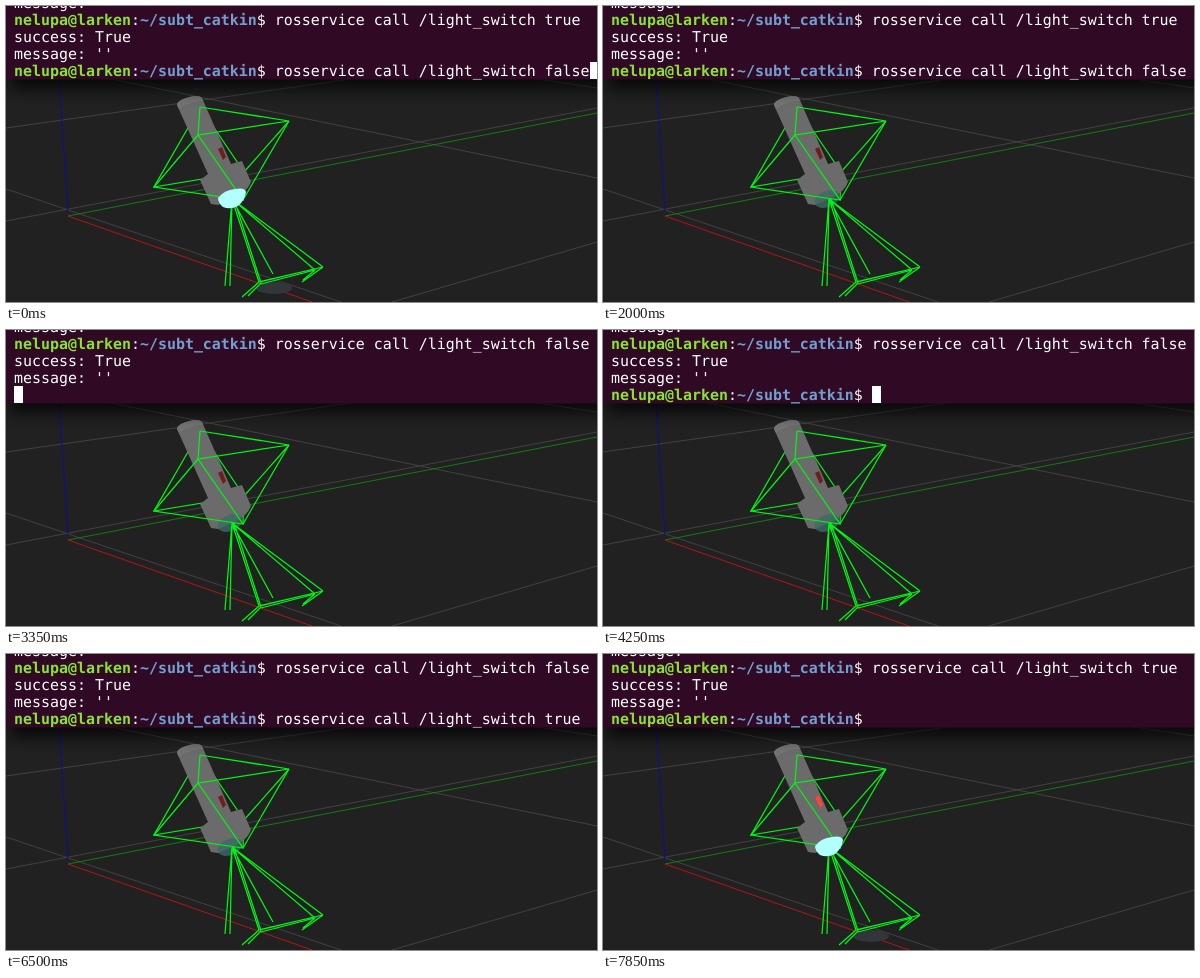
Recreate the animation shown at these times as an HTML page. Size 591 px wide and 296 px high, loop 8 s.

```html
<!DOCTYPE html>
<html lang="en">
<head>
<meta charset="utf-8">
<title>Light switch service</title>
<style>
  html, body { margin: 0; width: 100%; height: 100%; overflow: hidden; background: #212121; }
  svg { display: block; width: 591px; height: 296px; }
  text {
    font: 14.95px "DejaVu Sans Mono", monospace;
    fill: #fff;
    white-space: pre;
    text-rendering: geometricPrecision;
  }
  .user { fill: #8ae234; font-weight: bold; }
  .path { fill: #729fcf; font-weight: bold; }
  .wire { fill: none; stroke: #00f514; stroke-width: 1.25; }
</style>
</head>
<body>
<svg viewBox="0 0 591 296">
  <defs>
    <filter id="blur" x="-10%" y="-50%" width="120%" height="200%">
      <feGaussianBlur stdDeviation="8"/>
    </filter>
  </defs>
  <rect width="591" height="296" fill="#212121"/>

  <!-- floor grid and axes -->
  <path fill="none" stroke="#414141" d="M0 122L345 73M0 215L591 102M386 296L591 236
    M0 183L335 296M105 73L591 172M525 72L591 82"/>
  <path stroke="#0c0c9c" d="M62 206L53 73"/>
  <path stroke="#137a13" d="M62 210L591 107"/>
  <path stroke="#b31515" d="M62 210L306 296"/>
  <ellipse id="spot" cx="268" cy="282" rx="18" ry="6" fill="#30363a"/>

  <!-- flashlight between the far and near wires -->
  <path class="wire" d="M194 101L148 181L238 166L194 101M238 166L283 115M238 166L237 194"/>
  <path fill="#6b6b6b" d="M171 99Q171 95 180 92Q192 88 196 92L225 158L236 155L245 176
    Q241 186 230 191L212 199L205 198L194 174L202 168Z"/>
  <path fill="#747474" d="M171 99Q171 95 180 92Q192 88 196 92L197 95Q184 95 173 103Z"/>
  <path id="button" d="M212 143L216 141L220 151L217 154Z"/>
  <ellipse id="dimLens" cx="224" cy="193" rx="13" ry="8" transform="rotate(-22 224 193)"
    fill="#3f6a66" opacity=".8"/>
  <path class="wire" d="M194 101L192 129L283 115L194 101M192 129L148 181L237 194L192 129M237 194L283 115"/>
  <path class="wire" d="M226 193L219 280M226 193L224 280M226 193L267 268M226 193L253 276
    M228 193L255 277M226 193L317 261M226 193L309 264
    M253 276L317 261M255 278L309 264M253 276L236 291M255 277L242 290
    M317 261L296 276M309 264L297 274"/>
  <path id="brightLens" fill="#b2ffff" d="M212 192Q218 184 229 183Q239 181 240 186
    Q239 194 232 200Q224 204 217 201Q212 197 212 192Z"/>

  <!-- terminal -->
  <rect x="4" y="-20" width="610" height="103" fill="#000" opacity=".75" filter="url(#blur)"/>
  <rect width="591" height="73.5" fill="#300a24"/>
  <g id="rows"></g>
  <rect id="cursor" y="56" width="9" height="17" fill="#fff"/>
</svg>
<script>
const LOOP = 8000, CELL = 9, LINE = 17, LEFT = 8;
const $ = id => document.getElementById(id);

const USER = "nelupa@larken", PATH = "~/subt_catkin";
const PROMPT = USER + ":" + PATH + "$ ";
const CALL = PROMPT + "rosservice call /light_switch ";
const OK = "success: True", MSG = "message: ''";
const log = [MSG, CALL + "true", OK, MSG, CALL + "false", OK, MSG, CALL + "true", OK, MSG];

// [start, finished log lines, current line]
const steps = [
  [0, 4, CALL + "false"],
  [3100, 5, ""],
  [3350, 7, ""],
  [3450, 7, PROMPT],
  [4350, 7, CALL + "false"],
  [4750, 7, CALL + "true"],
  [7100, 8, ""],
  [7350, 10, ""],
  [7500, 10, PROMPT]
];

// times at which each part flips
const cursorFlips = [400, 1000, 1650, 2250, 2850, 3050, 3650, 4250, 5300, 5900, 6500, 7100, 7700];
const lensFlips = [400, 950, 2000, 2650, 3350, 7400];
const buttonFlips = [750, 1500, 2250, 2850, 7850];

const flipped = (t, flips) => flips.filter(f => f <= t).length % 2 === 1;
const show = (id, on) => $(id).setAttribute("visibility", on ? "visible" : "hidden");

function markup(line) {
  if (!line.startsWith(PROMPT)) return line;
  return `<tspan class="user">${USER}</tspan>:<tspan class="path">${PATH}</tspan>` +
    "$ " + line.slice(PROMPT.length);
}

let shown = null;
function drawText(step) {
  if (step === shown) return;
  shown = step;
  const [, done, current] = step;
  const lines = [...log.slice(done - 4, done), current];
  $("rows").innerHTML = lines
    .map((line, i) => `<text x="${LEFT}" y="${2 + i * LINE}">${markup(line)}</text>`)
    .join("");
  $("cursor").setAttribute("x", LEFT + current.length * CELL);
}

function draw(t) {
  drawText(steps.filter(s => s[0] <= t).pop());
  const lit = !flipped(t, lensFlips);
  show("cursor", !flipped(t, cursorFlips));
  show("brightLens", lit);
  show("spot", lit);
  show("dimLens", !lit);
  $("button").setAttribute("fill", flipped(t, buttonFlips) ? "#ff4433" : "#6e1f1c");
}

const start = performance.now();
function tick() {
  draw((performance.now() - start) % LOOP);
  requestAnimationFrame(tick);
}
tick();
</script>
</body>
</html>
```
